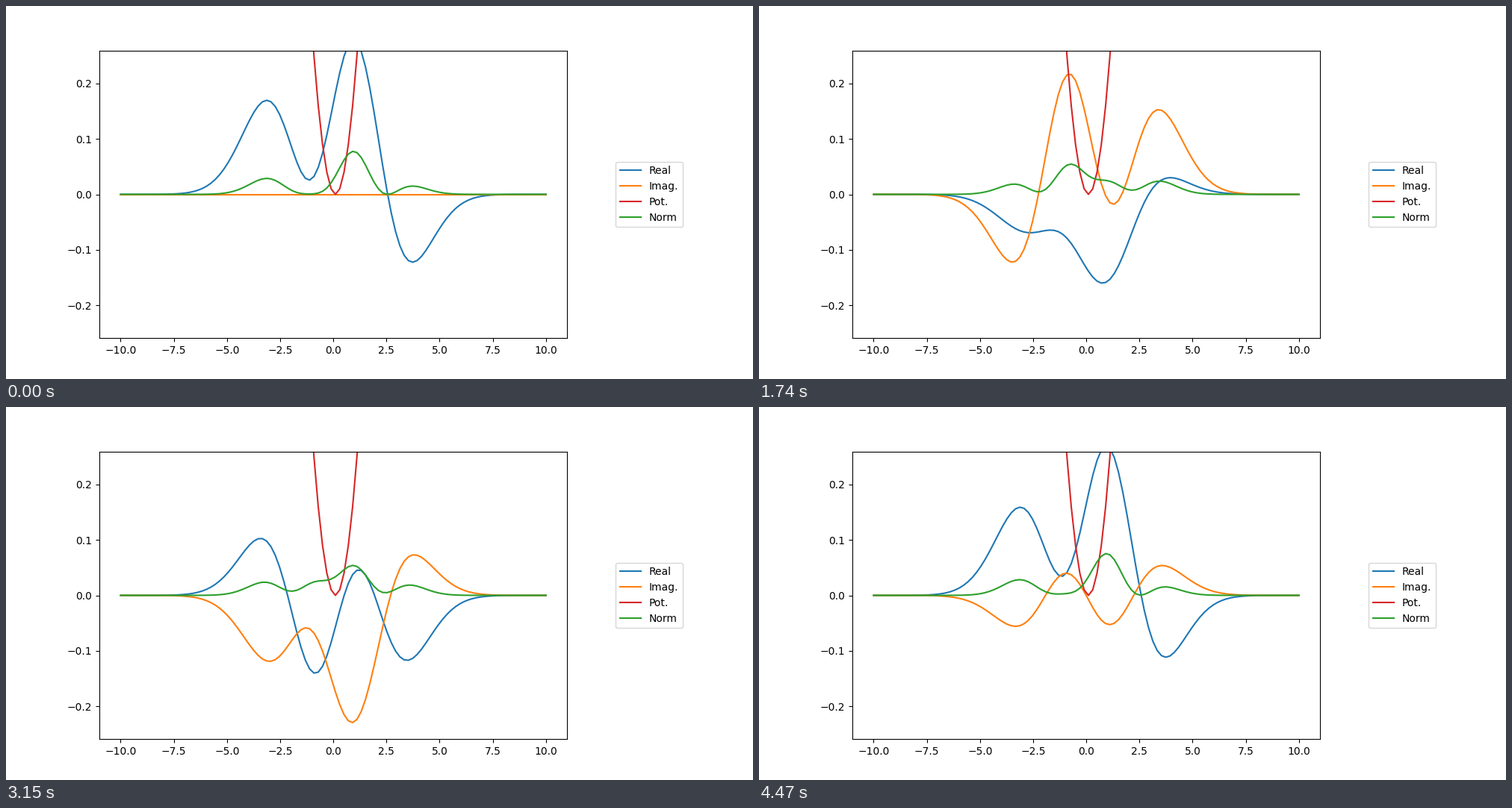
These frames come from a looping animation (1000 by 500 pixels, 4.5 s). A matplotlib script:

```python
import numpy as np
import matplotlib.pyplot as plt
from matplotlib.animation import FuncAnimation

POINTS, STEP = 100, 0.1
FRAMES, INTERVAL = 150, 30

# Harmonic well on a grid, kinetic term by finite differences
potential = (STEP * (np.arange(POINTS) - POINTS // 2)) ** 2
hop = 0.5 / STEP**2
hamiltonian = (
    np.diag(potential + 2 * hop)
    - hop * (np.eye(POINTS, k=1) + np.eye(POINTS, k=-1))
)
energies, states = np.linalg.eigh(hamiltonian)


def eigenstate(level):
    """Eigenvector whose sign is positive just right of the centre."""
    state = states[:, level]
    return state * np.sign(state[POINTS // 2 + 5])


ground, excited = eigenstate(0), eigenstate(3)
time_step = 2 * np.pi / energies[0] / FRAMES


def wave(frame):
    t = frame * time_step
    return (ground * np.exp(1j * energies[0] * t)
            + excited * np.exp(1j * energies[3] * t)) / np.sqrt(2)


fig, (ax, side) = plt.subplots(
    1, 2, figsize=(10, 5), dpi=100, gridspec_kw={"width_ratios": [8, 1]}
)
x = np.linspace(-10, 10, POINTS)
real, = ax.plot(x, ground, color="C0", label="Real")
imag, = ax.plot(x, ground, color="C1", label="Imag.")
well, = ax.plot(x, potential, color="C3", label="Pot.")
norm, = ax.plot(x, ground, color="C2", label="Norm")
limit = np.abs(ground).max()
ax.set_xlim(-11, 11)
ax.set_ylim(-limit, limit)

side.axis("off")
side.legend(handles=[real, imag, well, norm], loc="center")


def update(frame):
    psi = wave(frame)
    real.set_ydata(psi.real)
    imag.set_ydata(psi.imag)
    norm.set_ydata(np.abs(psi) ** 2)
    return real, imag, norm


update(0)
anim = FuncAnimation(fig, update, frames=FRAMES, interval=INTERVAL,
                     repeat=True, repeat_delay=0)
plt.show()
```
